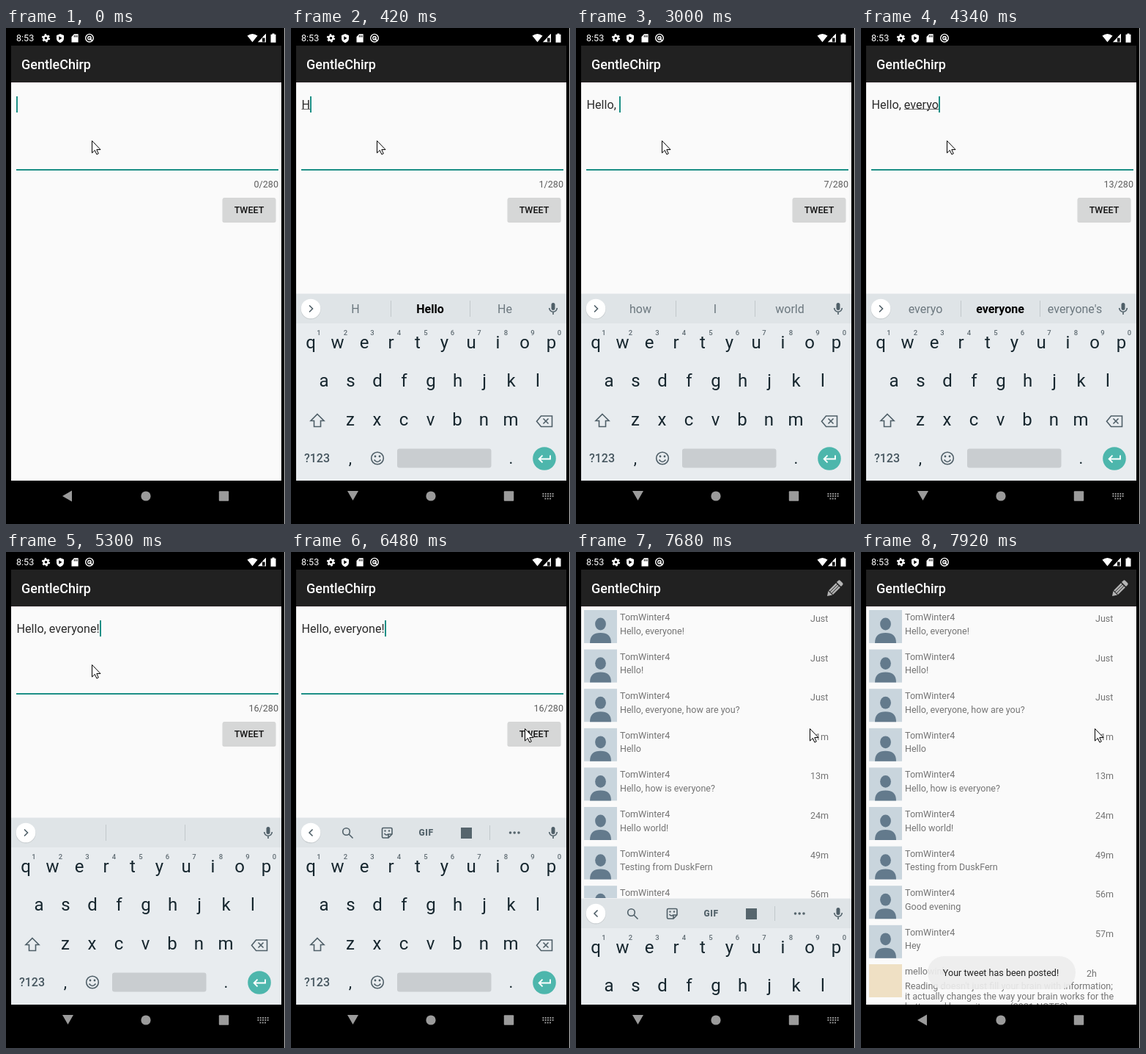
An HTML page that plays this animation: 381x675 px, repeating every 8000 ms.

```html
<!DOCTYPE html>
<html lang="en">
<head>
<meta charset="utf-8">
<style>
  html, body { margin: 0; width: 100%; height: 100%; overflow: hidden; background: #000; }
  svg { display: block; }
  text { font-family: Roboto, sans-serif; white-space: pre; }
  .mid { text-anchor: middle; }
  .end { text-anchor: end; }
  .med { font-weight: 500; }
  .line { fill: none; stroke: #4f5f68; stroke-width: 1.6; }
</style>
</head>
<body>
<svg width="381" height="675" viewBox="0 0 381 675">
  <rect width="381" height="675"/>
  <rect x="380" width="1" height="675" fill="#bbb"/>
  <rect x="7" y="74" width="369" height="542" fill="#fafafa"/>

  <g id="compose">
    <text id="typed" x="14.5" y="110" font-size="16.16" fill="#2b2b2b"></text>
    <rect id="composing" y="110" height="1" fill="#666"/>
    <rect id="caret" y="93" width="2" height="22" fill="#1d8f86"/>
    <rect x="14" y="192" width="358" height="2" fill="#1d8f86"/>
    <text id="count" class="end" x="372" y="217" font-size="12.57" fill="#5c5c5c"></text>
    <rect id="shade" x="295.5" y="231.5" width="73" height="33.3" rx="2.5" opacity=".16"/>
    <rect id="button" x="296" y="231" width="72" height="32.5" rx="2"/>
    <text class="mid med" x="332" y="252" font-size="12.57" fill="#111">TWEET</text>
  </g>

  <g id="list">
    <rect x="7" y="74" width="369" height="542" fill="#fafafa"/>
    <g id="rows" font-size="12.57" fill="#757575"></g>
    <g id="toast">
      <rect x="91" y="550" width="202" height="45" rx="22" fill="#eee" opacity=".9"/>
      <text class="mid" x="191" y="577" font-size="12.57" fill="#222">Your tweet has been posted!</text>
    </g>
  </g>

  <g id="keyboard">
    <rect x="7" y="361" width="369" height="2" fill="#eef0f2"/>
    <rect x="7" y="362" width="369" height="40" fill="#dfe4e7"/>
    <rect x="7" y="402" width="369" height="214" fill="#e8ecef"/>
    <circle cx="27" cy="383" r="13.6" fill="#c9ced1"/>
    <circle cx="27" cy="382" r="13.3" fill="#fff"/>
    <path id="chevron" class="line"/>
    <g id="words" font-size="16" fill="#6c787f">
      <path d="M136.5 371v22M244.5 371v22" stroke="#c2c8cb"/>
      <text class="mid" x="88" y="388"></text>
      <text class="mid" x="190" y="388"></text>
      <text class="mid" x="292" y="388"></text>
    </g>
    <g id="tools" fill="#56656d">
      <circle class="line" cx="75.5" cy="380.5" r="4.8"/>
      <path class="line" d="M79 384l5.5 5.5"/>
      <path class="line" d="M126 375.5h10.5a1.5 1.5 0 0 1 1.5 1.5v7l-5 5h-7a1.5 1.5 0 0 1-1.5-1.5v-10.5a1.5 1.5 0 0 1 1.5-1.5zM138 384h-5v5M127.5 383q2.5 3.5 5 1"/>
      <circle cx="128.5" cy="379.5" r="1.2"/><circle cx="134" cy="379.5" r="1.2"/>
      <text class="mid" x="184.5" y="386" font-size="12" font-weight="900" letter-spacing=".6">GIF</text>
      <rect x="232" y="375" width="15" height="15"/>
      <path d="M271.5 372v20" stroke="#c2c8cb"/>
      <circle cx="299.5" cy="382" r="1.8"/><circle cx="305.2" cy="382" r="1.8"/><circle cx="311" cy="382" r="1.8"/>
    </g>
    <rect x="355.5" y="374" width="5" height="10" rx="2.5" fill="#4f5f68"/>
    <path class="line" d="M352.7 381a5.3 5.3 0 0 0 10.6 0M358 386.5v3.5"/>
    <g id="keys" fill="#16262e"></g>
    <path class="line" d="M36 525.5l9 9h-4.5v8h-9v-8h-4.5z"/>
    <path class="line" d="M341.5 528h15v14.5h-15l-6-7.25zM344.5 531.5l7 7m0-7l-7 7"/>
    <circle class="line" cx="118" cy="585.5" r="8.3"/>
    <path class="line" d="M113.5 587.5q4.5 6 9 0"/>
    <circle cx="115" cy="583" r="1.4" fill="#4f5f68"/><circle cx="121" cy="583" r="1.4" fill="#4f5f68"/>
    <rect x="145" y="572.5" width="128.5" height="26" rx="3" fill="#c9cdd0"/>
    <circle cx="346" cy="586" r="15.8" fill="#4db6ac"/>
    <path d="M354 581.5v5h-15m4.5-4.8l-4.8 4.8 4.8 4.8" fill="none" stroke="#fff" stroke-width="1.9"/>
  </g>

  <rect x="7" y="616" width="369" height="59"/>
  <g fill="#9b9b9b">
    <path id="back"/>
    <circle cx="191" cy="637" r="6.6"/>
    <rect x="290.8" y="630.3" width="13.4" height="13.4" rx="1"/>
    <path id="switcher" d="M343.5 634h15M343.5 637h15M346.5 640.5h9" stroke="#9b9b9b" stroke-width="1.8" stroke-dasharray="1.8 1.5"/>
  </g>

  <rect x="7" y="74" width="369" height="1.5" fill="#efe5ea"/>
  <rect x="7" y="24" width="369" height="50" fill="#212121"/>
  <text class="med" x="21" y="56" font-size="18" fill="#fff">GentleChirp</text>
  <g id="pencil" transform="translate(343 60) rotate(-45)" fill="#b4b4b4">
    <path d="M0 0l6-4v8zM7 -4h14v2.3h-14zM7 -1h14v2.2h-14zM7 2h14v2.3h-14zM22.5 -4.2h3q2 0 2 2v4.4q0 2-2 2h-3z"/>
  </g>

  <g fill="#fff">
    <text x="14" y="18" font-size="12.57">8:53</text>
    <g fill="none" stroke="#fff">
      <circle cx="54.5" cy="13.7" r="3" stroke-width="2.4"/>
      <circle cx="54.5" cy="13.7" r="4.6" stroke-width="2.2" stroke-dasharray="2.41"/>
      <circle cx="114" cy="13.7" r="5.3" stroke-width="1.4"/>
      <circle cx="114" cy="13.7" r="2.2" stroke-width="1.3"/>
      <path d="M114 13.7l4 4" stroke-width="1.4"/>
    </g>
    <path d="M74 8l5 2v4c0 3.4-2.3 5.3-5 6.2c-2.7-.9-5-2.8-5-6.2v-4z"/>
    <path d="M72.3 11.2l4.2 2.6-4.2 2.6z" fill="#000"/>
    <path d="M93 8.3h5.7v11.2h-9.2v-7.6z"/>
    <path d="M93.3 10v2.5M95.2 10v2.5M97.1 10v2.5" stroke="#000" stroke-width=".9"/>
    <path d="M329.5 10.5q7-5 14 0l-7 8.7z"/>
    <path d="M355 8v11.2h-11.2z"/>
    <path d="M350 13.5h4.5v5.2h-4.5z" fill="#000"/>
    <path d="M350 12.8l5-5v11.4h-1.4v-8z"/>
    <path d="M361.5 8.8h2v-1.3h3v1.3h2v11h-7z"/>
  </g>

  <!-- Window edges as the screen starts to close -->
  <g id="closing">
    <rect x="7" y="74" width="369" height="1" fill="#212121"/>
    <rect x="7" y="615" width="369" height="1"/>
    <rect x="375" y="50" width="1" height="593" fill="#fff"/>
  </g>
  <path id="pointer" d="M.5 .5v16.5l3.8-3.6 2.6 5.6 2.4-1.1-2.5-5.4h5.2z" fill="#fff" stroke="#000"/>
</svg>

<script>
const $ = id => document.getElementById(id);
const show = (id, on) => $(id).style.display = on ? '' : 'none';
const set = (id, attrs) => { for (const k in attrs) $(id).setAttribute(k, attrs[k]); };
const label = (x, y, s, extra = '') => `<text x="${x}" y="${y}" ${extra}>${s}</text>`;

// Keys
const keyRow = (letters, x, y) => [...letters].map((c, i) =>
  label(x + 36.5 * i, y, c, 'class="mid" font-size="24"')).join('');
$('keys').innerHTML =
  keyRow('qwertyuiop', 27, 436) + keyRow('asdfghjkl', 45, 488) + keyRow('zxcvbnm', 81, 541) +
  [...'1234567890'].map((c, i) =>
    label(38 + 36.5 * i, 418, c, 'class="mid med" font-size="9.5" fill="#5f6b72"')).join('') +
  label(35.5, 591, '?123', 'class="mid med" font-size="16" fill="#46565f"') +
  label(81, 593, ',', 'class="mid" font-size="22"') + label(300.5, 593, '.', 'class="mid" font-size="22"');

// Timeline rows
const posts = [
  ['Hello, everyone!', 'Just'], ['Hello!', 'Just'], ['Hello, everyone, how are you?', 'Just'],
  ['Hello', '11m'], ['Hello, how is everyone?', '13m'], ['Hello world!', '24m'],
  ['Testing from DuskFern', '49m'], ['Good evening', '56m'], ['Hey', '57m']
];
const avatar = `<rect x="11" y="79" width="45" height="45" fill="#c9d5dd"/>
  <ellipse cx="33.5" cy="98" rx="7.4" ry="8.4" fill="#637a8c"/>
  <path d="M19 124c0-10 5-14 14.5-14s14.5 4 14.5 14z" fill="#637a8c"/>`;
const quote = [
  "Reading doesn't just fill your brain with information;",
  'it actually changes the way your brain works for the',
  'better and keeps it young (2021 NOTES)'
];
$('rows').innerHTML = posts.map(([body, age], i) =>
  `<g transform="translate(0 ${53.6 * i})">${avatar}` + label(60, 93, 'TomWinter4') +
  label(60, 111.5, body) + label(320, 95, age) + '</g>').join('') +
  '<rect x="11" y="561" width="45" height="45" fill="#efe0c4"/>' +
  label(60, 575, 'mellowink') + label(308, 578, '2h') +
  quote.map((s, i) => label(60, 594.5 + 14.3 * i, s)).join('');

// Time, text, caret visible, suggestions (none: tool strip)
const typing = [
  [0, '', 1], [120, '', 0], [270, '', 1],
  [420, 'H', 1, 'H|Hello|He'], [820, 'He', 1, 'He|Hello|Hey'],
  [1130, 'Hel', 1, 'Hel|Hello|Hey'], [1250, 'Hell', 1, 'Hell|Hello|Hey'],
  [1530, 'Hello', 1, "Hellos|Hello|Hello's"], [1730, 'Hello ', 1, 'how|I|and'],
  [2330, 'Hello ', 0, 'how|I|and'], [2500, 'Hello', 1, "Hellos|Hello|Hello's"],
  [2670, 'Hello,', 1, 'how|I|world'], [2840, 'Hello, ', 1, 'how|I|world'],
  [3270, 'Hello, e', 1, 'e|everyone|every'], [3420, 'Hello, ev', 1, 'ev|every|even'],
  [3570, 'Hello, eve', 1, 'eve|even|every'], [3730, 'Hello, ever', 1, 'ever|every|everyone'],
  [4030, 'Hello, every', 1, 'every|everyone|everything'],
  [4340, 'Hello, everyo', 1, "everyo|everyone|everyone's"],
  [4490, 'Hello, everyon', 1, "everyon|everyone|everyone's"],
  [4610, 'Hello, everyone', 1, "everyones|everyone|everyone's"],
  [5140, 'Hello, everyone', 0, "everyones|everyone|everyone's"],
  [5290, 'Hello, everyone!', 1, '||'], [5440, 'Hello, everyone!', 1],
  [5900, 'Hello, everyone!', 0], [6290, 'Hello, everyone!', 1],
  [6760, 'Hello, everyone!', 0], [7560, 'Hello, everyone!', 1]
];
// Time, share of the pointer's way to the button
const travel = [[0, 0], [5710, .08], [5900, .42], [6100, .8], [6290, .97], [6480, 1]];
// Time, keyboard offset, list shown, toast opacity
const hidden = 260;
const scenes = [
  [0, hidden, 0, 0], [120, 110, 0, 0], [270, 0, 0, 0],
  [7680, 110, 1, 0], [7800, hidden, 1, .45], [7920, hidden, 1, 1]
];
const at = (steps, t) => steps.findLast(s => s[0] <= t);

function drawText(t) {
  const [, text, caret, hints] = at(typing, t);
  const typed = $('typed');
  typed.textContent = text;
  const width = n => n ? typed.getSubStringLength(0, n) : 0;
  const word = (text.match(/[a-z]+$/i) || [''])[0];
  const start = 14.5 + width(text.length - word.length), end = 14.5 + width(text.length);
  set('composing', { x: start, width: end - start });
  set('caret', { x: text ? Math.round(end) : 14 });
  show('caret', caret);
  $('count').textContent = text.length + '/280';

  show('words', hints);
  show('tools', !hints);
  set('chevron', { d: hints ? 'M25 377.5l4.5 4.5-4.5 4.5' : 'M29.5 377.5l-4.5 4.5 4.5 4.5' });
  if (!hints) return;
  const slots = $('words').querySelectorAll('text');
  hints.split('|').forEach((s, i) => slots[i].textContent = s);
  slots[1].style.fontWeight = word ? 700 : 400;
  slots[1].style.fill = word ? '#000' : '';
}

function draw(t) {
  drawText(t);
  const [, drop, listed, toast] = at(scenes, t);
  const keysUp = drop < hidden;
  set('keyboard', { transform: `translate(0 ${drop})` });
  show('keyboard', keysUp);
  show('switcher', keysUp);
  set('back', { d: keysUp ? 'M77 630h15l-7.5 13z' : 'M77 637l13-7.5v15z' });
  show('list', listed);
  show('pencil', listed);
  set('toast', { opacity: toast });

  const pressed = t >= 6760 && t < 7030;
  set('button', { fill: pressed ? '#c2c3c3' : '#d6d7d7' });
  set('shade', { height: pressed ? 34.5 : 33.3 });
  show('closing', t >= 7560 && t < 7680);

  const k = at(travel, t)[1];
  set('pointer', { transform: `translate(${Math.round(117 + 202 * k)} ${Math.round(153 + 87 * k)})` });
}

function tick() {
  draw(performance.now() % 8000);
  requestAnimationFrame(tick);
}
tick();
</script>
</body>
</html>
```
